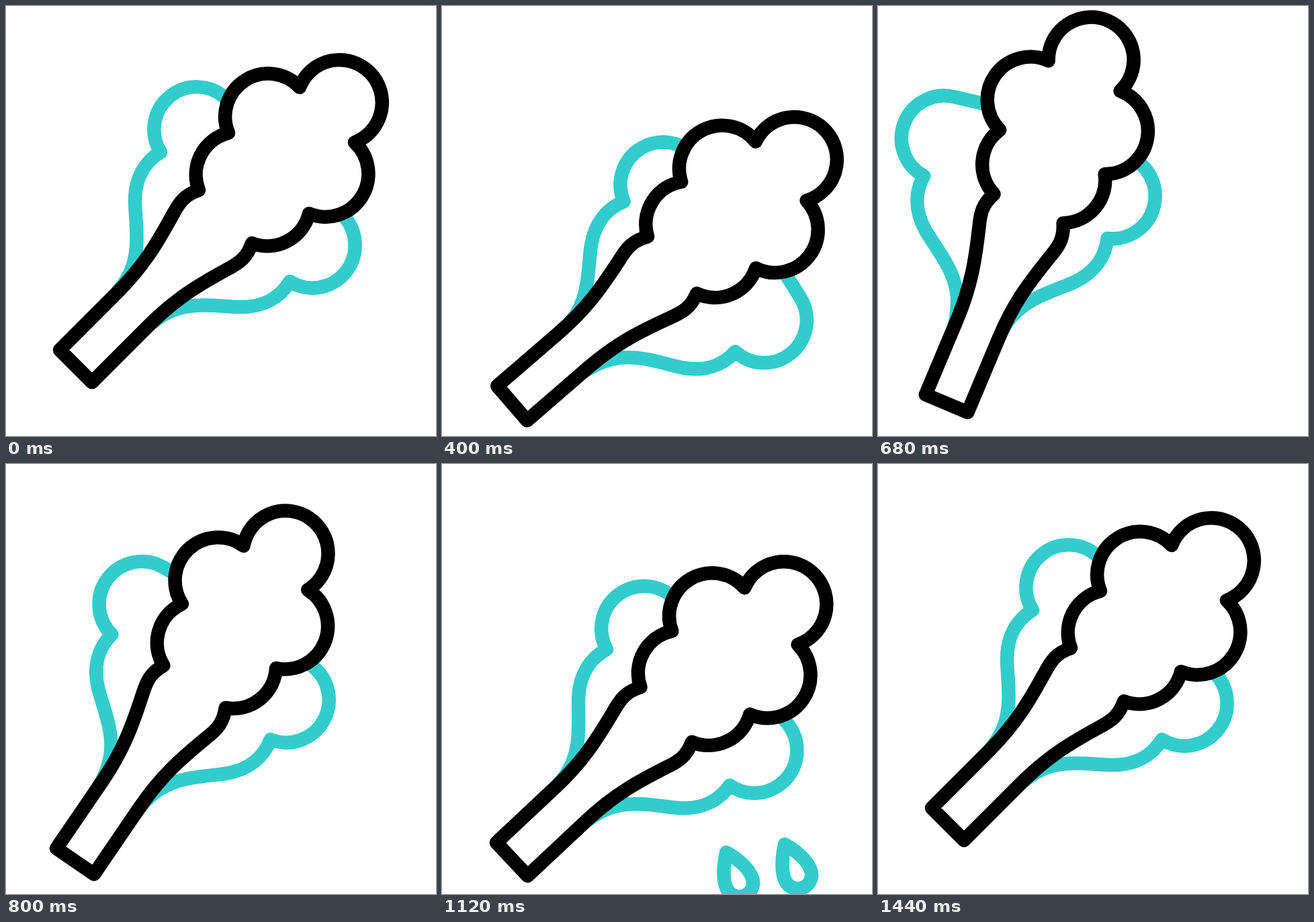
Animation of 640 by 640 pixels, one loop 1.48 s. Source, as an HTML page:

```html
<!DOCTYPE html>
<html lang="en">
<head>
<meta charset="utf-8">
<title>Broccoli</title>
<style>
  html, body { margin: 0; height: 100%; overflow: hidden; background: #fff; }
  svg { display: block; width: 100vw; height: 100vh; }
  path { fill: #fff; stroke: #3cc; stroke-width: 20.5; stroke-linecap: round; stroke-linejoin: round; }
  #head { stroke: #000; }
</style>
</head>
<body>
<svg viewBox="0 0 640 640">
  <defs>
    <path id="floret" d="M155 438C182 410 195 385 194.5 345C194.5 322 192 305 192 290
      C192 257 206 232 230 217.5A63.5 63.5 0 0 1 326.6 136.9L382 188"/>
    <path id="drop" d="M510 566C502 605 507 632 530 632C546 631 554 616 548 602C542 588 525 574 510 566Z"/>
  </defs>
  <g id="drops">
    <use href="#drop"/>
    <use href="#drop" x="-87" y="12"/>
  </g>
  <g id="left"><use href="#floret"/></g>
  <g id="right"><use href="#floret" transform="matrix(0 -1 -1 0 640 640)"/></g>
  <path id="head" d="M80 512L165 427C205 387 225 353 248 311C258 292 266 281 287 274
    A64 64 0 0 1 331 189A64 64 0 0 1 437 121A63.5 63.5 0 1 1 519 203
    A64 64 0 0 1 451 309A64 64 0 0 1 366 353
    C359 374 348 382 329 392C287 415 253 435 213 475L128 560Z"/>
</svg>
<script>
  const LOOP = 1480, STEP = 40;
  const $ = id => document.getElementById(id);

  // Eased value through [time, value] keys
  function track(keys, t) {
    if (t <= keys[0][0]) return keys[0][1];
    for (let i = 1; i < keys.length; i++) {
      const [t0, a] = keys[i - 1], [t1, b] = keys[i];
      if (t < t1) {
        const p = (t - t0) / (t1 - t0);
        return a + (b - a) * p * p * (3 - 2 * p);
      }
    }
    return keys[keys.length - 1][1];
  }

  const swing = (a, b, c) => [[80, 0], [400, a], [680, b], [960, c], [1200, 0]];
  const lift = [[80, 0], [400, 55.2], [1068, 55.2], [1440, 0]];
  const body = swing(4.2, -22.2, 7.1);
  // Side florets follow the body and bend further about their own stems
  const florets = {
    left: { bend: swing(4.7, -7.5, 4.9), pivot: [155, 438] },
    right: { bend: swing(6.4, -2.9, 5.6), pivot: [202, 485] }
  };

  function draw(t) {
    const pose = `translate(0 ${track(lift, t)}) rotate(${track(body, t)} 104 541)`;
    $("head").setAttribute("transform", pose);
    for (const id in florets) {
      const { bend, pivot } = florets[id];
      $(id).setAttribute("transform", `${pose} rotate(${track(bend, t)} ${pivot})`);
    }

    const fall = (t - 1120) / 160;
    $("drops").setAttribute("transform", `translate(${25 * fall} ${90 * fall})`);
    $("drops").setAttribute("visibility", t >= 920 && t < 1400 ? "visible" : "hidden");
  }

  const start = performance.now();
  function tick() {
    const t = (performance.now() - start) % LOOP;
    draw(Math.floor(t / STEP) * STEP);
    requestAnimationFrame(tick);
  }
  tick();
</script>
</body>
</html>
```
